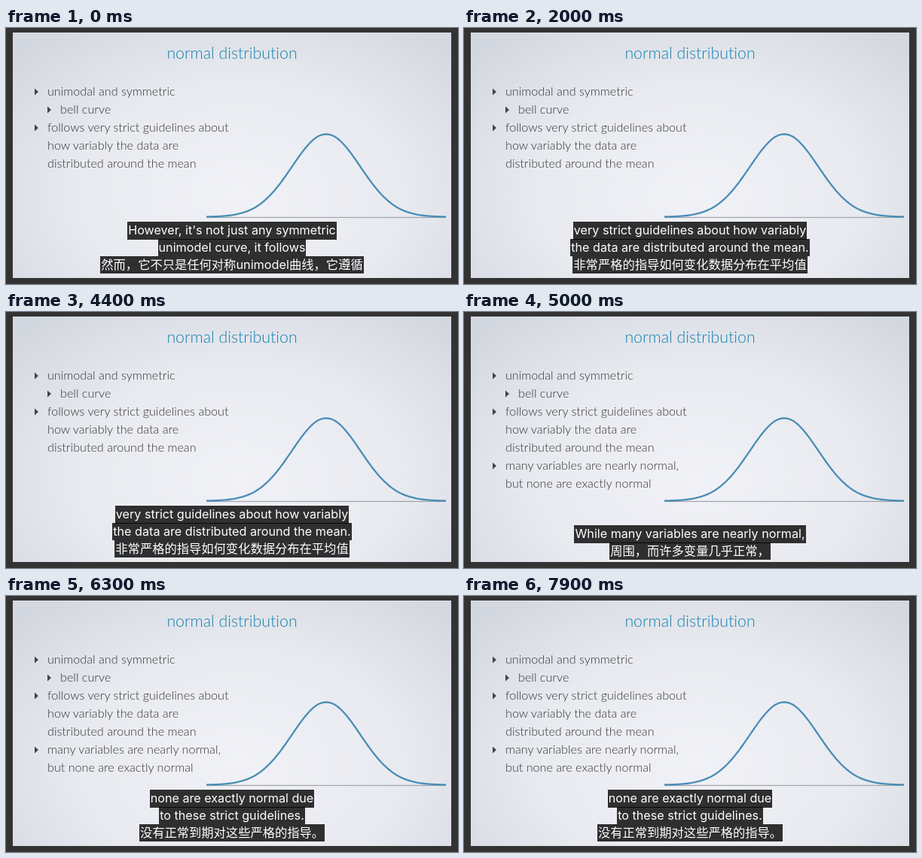
An HTML page that plays this animation: 600x341 px, repeating every 8 s.

```html
<!DOCTYPE html>
<html lang="zh-CN">
<head>
<meta charset="utf-8">
<style>
html, body { margin: 0; width: 100%; height: 100%; overflow: hidden; background: #343334; }
#slide { position: absolute; left: 9px; top: 6px; width: 582px; height: 327px;
  background: radial-gradient(ellipse 68% 85% at 52% 66%, #f1f2f7, #e8eaf0 55%, #d3d7df); }
svg { position: absolute; left: 0; top: 0; }
svg text { font: 300 16.15px Lato, sans-serif; font-variant-ligatures: none; fill: #333; }
svg .title { font-size: 21.3px; fill: #1380b0; text-anchor: middle; }
#caption { position: absolute; left: 0; width: 600px; text-align: center; color: #fff;
  font: 16.15px/23px Inter, "Noto Sans CJK SC", "Noto Sans CJK", sans-serif; }
#caption div { height: 23px; white-space: nowrap; }
#caption div:last-child { font-size: 16.3px; }
#caption span { display: inline-block; padding: 0 1px; background: rgba(0, 0, 0, .8); }
#caption div:first-child span { padding-bottom: 1px; }
</style>
</head>
<body>
<div id="slide"></div>
<svg width="600" height="341" viewBox="0 0 600 341">
  <text class="title" x="300" y="41">normal distribution</text>
  <g id="list"></g>
  <g id="extra"></g>
  <path d="M266 252.3H584" stroke="#929599"/>
  <path id="bell" fill="none" stroke="#4a8db5" stroke-width="2.3"/>
</svg>
<div id="caption"></div>
<script>
const LOOP = 8000;
const EXTRA_START = 4500;
const $ = id => document.getElementById(id);

// Start time, top, lines
const captions = [
  [0, 258, "However, it's not just any symmetric", "unimodel curve, it follows",
    "然而，它不只是任何对称unimodel曲线，它遵循"],
  [1500, 258, "very strict guidelines about how variably",
    "the data are distributed around the mean.", "非常严格的指导如何变化数据分布在平均值"],
  [4500, 284, "While many variables are nearly normal,", "周围，而许多变量几乎正常，"],
  [5800, 258, "none are exactly normal due", "to these strict guidelines.",
    "没有正常到期对这些严格的指导。"]
];

const line = (x, y, text) => `<text x="${x}" y="${y}">${text}</text>`;
const bullet = (x, y, text) =>
  `<path d="M${x - 17} ${y - 9.5}l5 4.5l-5 4.5z" fill="#444"/>` + line(x, y, text);

$("list").innerHTML =
  bullet(55, 90, "unimodal and symmetric") +
  bullet(72, 114, "bell curve") +
  bullet(55, 138, "follows very strict guidelines about") +
  line(55, 162, "how variably the data are") +
  line(55, 186, "distributed around the mean");
$("extra").innerHTML =
  bullet(55, 210, "many variables are nearly normal,") +
  line(55, 234, "but none are exactly normal");

// Normal density over 3.5 standard deviations each side
const points = [];
for (let x = -159; x <= 159; x += 3) {
  const z = x / 45.4;
  points.push(`${425 + x} ${(251.7 - 110.4 * Math.exp(-z * z / 2)).toFixed(2)}`);
}
$("bell").setAttribute("d", "M" + points.join("L"));

let shown;
function draw(t) {
  const current = captions.filter(c => c[0] <= t).pop();
  if (current !== shown) {
    const [, top, ...lines] = shown = current;
    $("caption").style.top = top + "px";
    $("caption").innerHTML = lines.map(s => `<div><span>${s}</span></div>`).join("");
  }
  $("extra").style.display = t < EXTRA_START ? "none" : "";
}

function tick() {
  draw(performance.now() % LOOP);
  requestAnimationFrame(tick);
}
tick();
</script>
</body>
</html>
```
